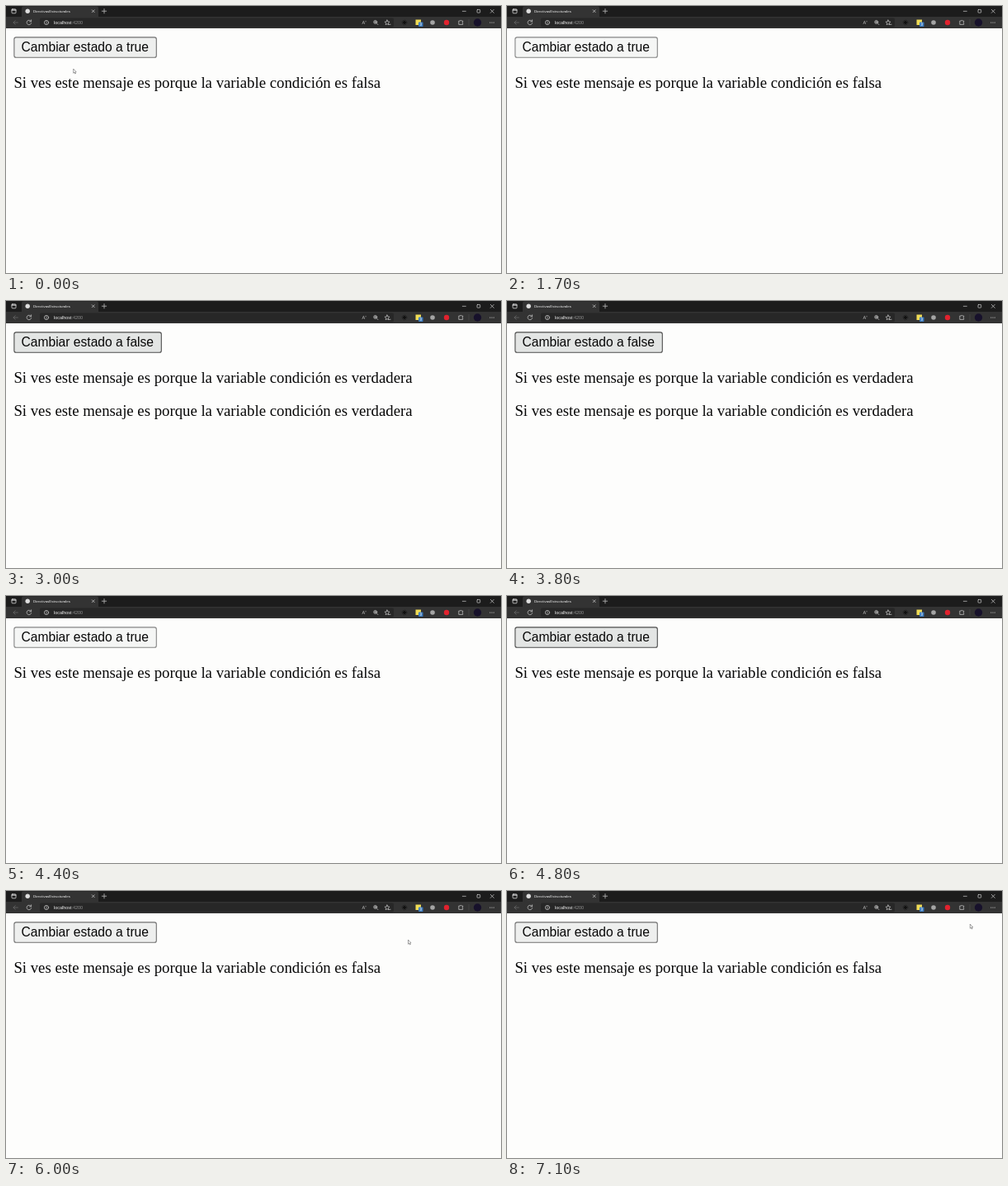
Recreate the animation shown at these times as an HTML page. Size 600 px wide and 323 px high, loop 7200 ms.

```html
<!DOCTYPE html>
<html lang="es">
<head>
<meta charset="utf-8">
<title>DirectivasEstructurales</title>
<style>
  html, body { margin: 0; width: 100%; height: 100%; overflow: hidden; background: #fdfdfc; }
  svg { display: block; width: 100%; height: 100%; }
  .ui { font-family: "Liberation Sans", Arial, sans-serif; fill: #f2f2f2; }
  .icon { fill: none; stroke: #d0d0d0; stroke-width: .7; stroke-linecap: round; stroke-linejoin: round; }
  .dim { stroke: #6d6d6d; }
  .message { font: 18.75px "Liberation Serif", "Times New Roman", serif; fill: #080808; }
  #label { font: 15.62px "Liberation Sans", Arial, sans-serif; fill: #080808; }
</style>
</head>
<body>
<svg viewBox="0 0 600 323" xmlns="http://www.w3.org/2000/svg">
  <rect width="600" height="323" fill="#fdfdfc"/>

  <!-- Tab strip -->
  <rect width="600" height="14" fill="#1c1c1c"/>
  <path d="M19 14V2.5Q19 .5 21 .5H110Q112 .5 112 2.5V14Z" fill="#333"/>
  <g class="icon">
    <rect x="7" y="3.8" width="5" height="5" rx=".8" stroke="#f0f0f0"/>
    <path d="M7.2 5H11.8" stroke="#f0f0f0" stroke-width="1.2"/>
    <path d="M104.2 4.7l3 3m0-3l-3 3M116.3 6.2h5.4M119 3.5v5.4"/>
    <path d="M553.3 6.3h4M587.3 4.3l4 4m0-4l-4 4"/>
    <rect x="571" y="4.4" width="3.7" height="3.7" rx=".6"/>
  </g>
  <circle cx="26.2" cy="6.2" r="2.7" fill="#dedede"/>
  <text class="ui" x="33" y="7.8" font-size="4.4">DirectivasEstructurales</text>

  <!-- Toolbar -->
  <rect y="13" width="600" height="14" fill="#333"/>
  <rect x="41" y="14.5" width="429" height="11" rx="2" fill="#272727"/>
  <g class="icon">
    <path class="dim" d="M14.4 20H9m2.2-2.3L9 20l2.2 2.3"/>
    <path d="M30.3 18.4a2.8 2.8 0 1 0 .4 2.2M30.6 16.8v2h-2"/>
    <circle cx="49" cy="20" r="2.6"/>
    <path d="M49 19.8v1.4M49 18.5v.1"/>
    <circle cx="447.7" cy="19.4" r="2"/>
    <path d="M449.2 20.9l1.7 1.7M446.8 19.4h1.8M447.7 18.5v1.8"/>
    <path d="M462 17l.9 1.9 2 .3-1.5 1.5.3 2-1.7-1-1.8 1 .3-2-1.4-1.5 2-.3zM464 22.3h2"/>
    <path d="M549.2 18h1.5q.3-1.6 1.5 0h1.5v1.4q-1.6.6 0 1.5v1.5h-4.5z"/>
    <path d="M561 16.5v7" stroke="#555" stroke-width=".5"/>
  </g>
  <text class="ui" x="58" y="21.9" font-size="5.45">localhost<tspan fill="#949494">:4200</tspan></text>
  <text class="ui" x="431.5" y="22" font-size="5.5" fill-opacity=".8">A<tspan dy="-2" font-size="3">»</tspan></text>
  <g fill="none" stroke="#111">
    <circle cx="483" cy="20" r="1.4" fill="#111"/>
    <circle cx="483" cy="20" r="2.8" stroke-width="1" stroke-dasharray="1 1.2"/>
  </g>
  <rect x="496.5" y="16.5" width="6.5" height="6.5" fill="#f1dc55"/>
  <rect x="500" y="19.5" width="5.5" height="5.5" rx=".8" fill="#3979bd"/>
  <text class="ui" x="501.5" y="24" font-size="4.5">9</text>
  <circle cx="517" cy="20" r="2.8" fill="#a4a4a4"/>
  <circle cx="534" cy="20" r="3.2" fill="#e0222e"/>
  <circle cx="571.5" cy="20" r="4.7" fill="#17112b"/>
  <g fill="#d8d8d8">
    <circle cx="586.8" cy="20" r=".6"/><circle cx="589" cy="20" r=".6"/><circle cx="591.2" cy="20" r=".6"/>
  </g>

  <!-- Page -->
  <rect id="button" x="9.9" y="37.9" height="24.4" rx="2.3" stroke-width="1.1"/>
  <text id="label" x="18.5" y="55.4"></text>
  <text id="first" class="message" x="9.4" y="98.6"></text>
  <text id="second" class="message" x="9.4" y="139"></text>
  <path id="cursor" d="M0 0V5.2L1.2 4.2L2 6L2.8 5.6L2 3.9H3.5Z" fill="#fff" stroke="#555" stroke-width=".55"/>
</svg>
<script>
const LOOP = 7200, STEP = 100;
const ENTER = 200, LEAVE = 5600;
// Each click: mouse down, mouse up; the condition flips on release.
const CLICKS = [
  [1600, 1800], [2000, 2400], [2800, 2900], [3200, 3400], [3600, 3700],
  [4000, 4100], [4400, 4500], [4700, 4800], [4900, 5000], [5200, 5300]
];
const EXIT_PATH = [
  [5700, 215, 56], [5800, 265, 56], [5900, 265, 56], [6000, 487.5, 59],
  [6200, 515, 71], [6400, 540, 65], [6600, 558, 45], [6700, 561.3, 40]
];
const FILLS = { normal: "#eeefee", hover: "#e3e5e4", active: "#f5f6f5" };
const BORDERS = { normal: "#707070", hover: "#4c4c4c", active: "#858585" };
const el = Object.fromEntries(
  ["button", "label", "first", "second", "cursor"].map(id => [id, document.getElementById(id)]));

function pointAt(t) {
  if (t < ENTER) return [81.7, t < STEP ? 76 : 68];
  if (t < EXIT_PATH[0][0]) return null;
  const next = EXIT_PATH.findIndex(p => p[0] > t);
  if (next < 0) return EXIT_PATH.at(-1).slice(1);
  const [t0, x0, y0] = EXIT_PATH[next - 1], [t1, x1, y1] = EXIT_PATH[next];
  const k = (t - t0) / (t1 - t0);
  return [x0 + (x1 - x0) * k, y0 + (y1 - y0) * k];
}

function draw(time) {
  const t = Math.floor(time % LOOP / STEP) * STEP;
  const condition = CLICKS.filter(([, up]) => t >= up).length % 2 === 1;
  const pressed = CLICKS.some(([down, up]) => t >= down && t < up);
  const look = pressed ? "active" : t >= ENTER && t < LEAVE ? "hover" : "normal";
  const message = `Si ves este mensaje es porque la variable condición es ${condition ? "verdadera" : "falsa"}`;

  el.button.setAttribute("width", condition ? 178.4 : 172.4);
  el.button.setAttribute("fill", FILLS[look]);
  el.button.setAttribute("stroke", BORDERS[look]);
  el.label.textContent = `Cambiar estado a ${!condition}`;
  el.first.textContent = message;
  el.second.textContent = condition ? message : "";

  const point = pointAt(t);
  el.cursor.setAttribute("visibility", point ? "visible" : "hidden");
  if (point) el.cursor.setAttribute("transform", `translate(${point})`);
}

const start = performance.now();
function tick() {
  draw(performance.now() - start);
  requestAnimationFrame(tick);
}
tick();
</script>
</body>
</html>
```
